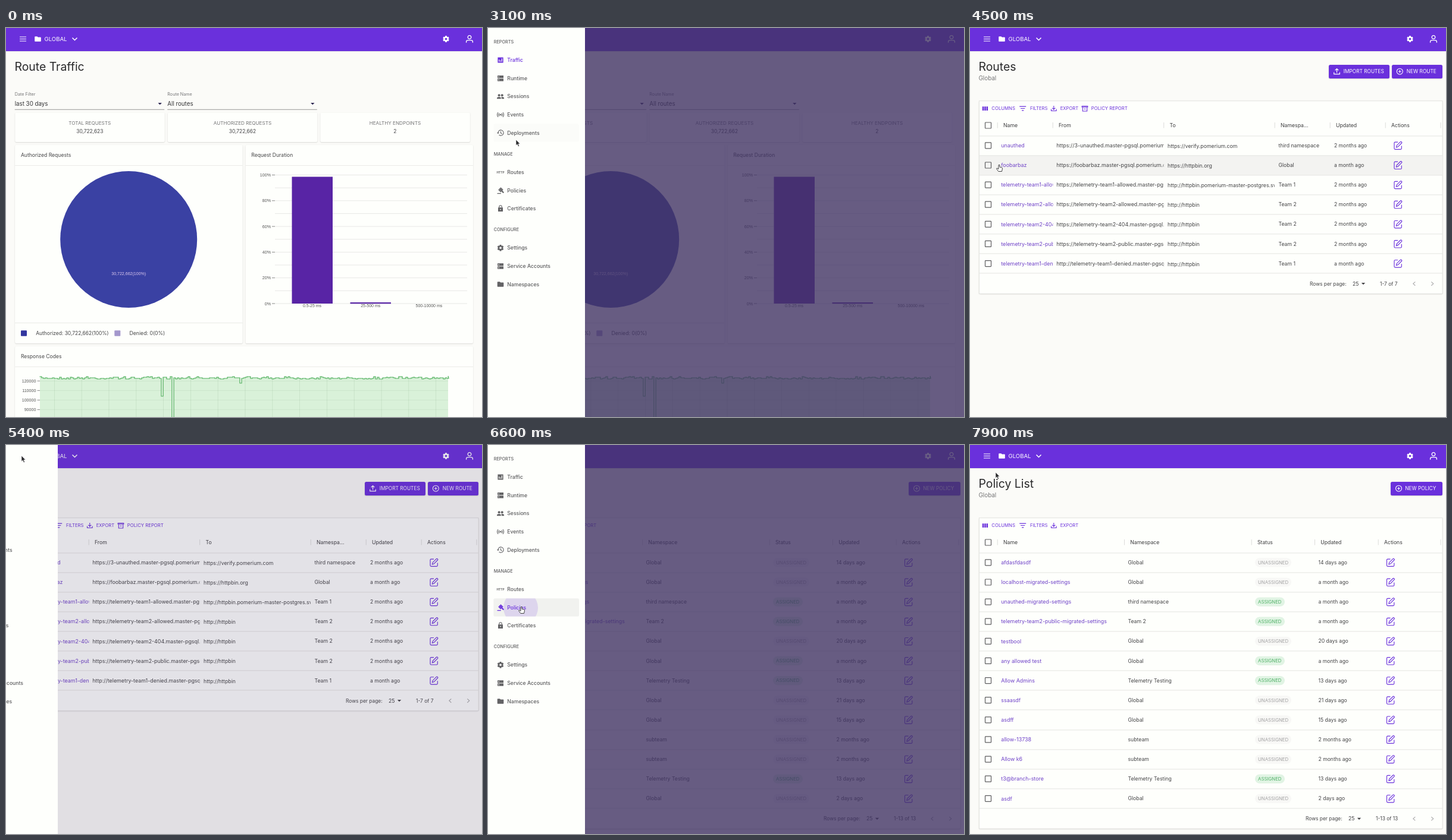
Animation of 800x655 px, one loop 8 s. Source, as an HTML page with a canvas:

```html
<!DOCTYPE html>
<html lang="en">
<head>
<meta charset="utf-8">
<title>Console tour</title>
<style>
html, body { margin: 0; width: 100%; height: 100%; overflow: hidden; background: #fbfbf8; }
canvas { display: block; width: 800px; height: 655px; }
</style>
</head>
<body>
<canvas id="stage" width="800" height="655"></canvas>
<script>
const ctx = document.getElementById('stage').getContext('2d');
const LOOP = 8000, STEP = 100, DRAWER = 163, TAU = Math.PI * 2;
const PURPLE = '#6a30dc', LINK = '#6f42c8', INK = '#444446', MUTED = '#757577';
const INTER = 'Inter, sans-serif', ARIAL = '"Liberation Sans", Arial, sans-serif';

// ---- drawing helpers ----
function text(s, x, y, size, color = INK, o = {}) {
  ctx.font = `${o.weight || 400} ${size}px ${o.family || INTER}`;
  ctx.textAlign = o.align || 'left';
  ctx.fillStyle = color;
  ctx.fillText(s, x, y + size * 0.36);
}
function clipped(s, x, y, right, size, color) {
  ctx.save();
  ctx.beginPath();
  ctx.rect(x, y - 10, right - x, 20);
  ctx.clip();
  text(s, x, y, size, color);
  ctx.restore();
}
function rect(x, y, w, h, color) {
  ctx.fillStyle = color;
  ctx.fillRect(x, y, w, h);
}
function round(x, y, w, h, r, color) {
  ctx.fillStyle = color;
  ctx.beginPath();
  ctx.roundRect(x, y, w, h, r);
  ctx.fill();
}
function path(d, x, y, color, width = 1.2) {
  ctx.save();
  ctx.translate(x, y);
  const p = new Path2D(d);
  if (width) {
    ctx.strokeStyle = color;
    ctx.lineWidth = width;
    ctx.stroke(p);
  } else {
    ctx.fillStyle = color;
    ctx.fill(p, 'evenodd');
  }
  ctx.restore();
}
function circle(x, y, r, color) {
  ctx.fillStyle = color;
  ctx.beginPath();
  ctx.arc(x, y, r, 0, TAU);
  ctx.fill();
}
function card(x, y, w, h) {
  ctx.save();
  ctx.shadowColor = 'rgba(0,0,0,.16)';
  ctx.shadowBlur = 2;
  ctx.shadowOffsetY = 0.7;
  round(x, y, w, h, 2, '#fefffc');
  ctx.restore();
}
const caret = (x, y, color = INK) => path('M-3.2-1.5H3.2L0 1.8Z', x, y, color, 0);

// ---- icons, centred on x, y ----
function gear(x, y, color, hole) {
  ctx.fillStyle = color;
  for (let i = 0; i < 6; i++) {
    ctx.save();
    ctx.translate(x, y);
    ctx.rotate(i * TAU / 6);
    ctx.fillRect(-1.5, -5.3, 3, 3);
    ctx.restore();
  }
  circle(x, y, 4.1, color);
  circle(x, y, 1.8, hole);
}
const folder = (x, y, c) => path('M-5.3-3.5Q-5.3-4.3-4.5-4.3H-1L0.2-3H4.5Q5.3-3 5.3-2.2V3.4Q5.3 4.2 4.5 4.2H-4.5Q-5.3 4.2-5.3 3.4Z', x, y, c, 0);
const server = (x, y, c) => path('M-5-4.7H5V-.5H-5ZM-5 .6H5V4.8H-5ZM-3.6-3.3V-1.9H-2.2V-3.3ZM-3.6 2V3.4H-2.2V2Z', x, y, c, 0);
const pencil = (x, y) => path('M0-5.8H-4.5Q-6-5.8-6-4.3V5Q-6 6.5-4.5 6.5H4.8Q6.3 6.5 6.3 5V.6M-2.6 3.1L-1.9 .1L4.4-6.2Q5.3-7 6.3-6Q7.3-5 6.4-4.1L.2 2.2Z', x, y, PURPLE, 1.15);
const exportIcon = (x, y) => path('M0-4.5V1.6M-2.5-.8L0 1.7L2.5-.8M-4.3 1V4H4.3V1', x, y, PURPLE, 1.1);
const icons = {
  chart(x, y, c) {
    path('M-4.6-4.6H4.6V4.6H-4.6ZM-2.9-.8V2.8H-1.7V-.8ZM-.6 .6V2.8H.6V.6ZM1.7-2.8V2.8H2.9V-2.8Z', x, y, c, 0);
  },
  server,
  people(x, y, c) {
    circle(x - 2.4, y - 2, 2, c);
    circle(x + 2.7, y - 2, 2, c);
    path('M-6 4V2.5Q-5.5 .6-2.5 .6Q.5 .6 .8 2.5V4ZM1.8 4V2.5Q1.8 1.3 1.1 .7Q5.7 .2 6 2.5V4Z', x, y, c, 0);
  },
  signal(x, y, c) {
    circle(x, y, 1.3, c);
    path('M-2-2.4Q-4 0-2 2.4M2-2.4Q4 0 2 2.4M-4-4Q-7 0-4 4M4-4Q7 0 4 4', x, y, c, 1.1);
  },
  history(x, y, c) {
    path('M-4.1 0A4.6 4.6 0 1 1-2.6 3.4M.5-2.4V.4L2.6 1.7', x, y, c, 1.1);
    path('M-6-.4H-2.2L-4.1 1.8Z', x, y, c, 0);
  },
  http(x, y, c) { text('HTTP', x, y, 4.8, c, { weight: 700, align: 'center' }); },
  gavel(x, y, c) {
    path('M-5.5 5.1H.8', x, y, c, 1.3);
    path('M-3.2-1.7L1 2.5M-.2-4.7L4 -.5', x, y, c, 1.8);
    path('M-1.7-3.2L2.5 1M.6-1L5.2 4', x, y, c, 2.2);
  },
  lock(x, y, c) {
    path('M-4-1.7H4V5H-4ZM-.9 1.6A.9.9 0 1 0 .9 1.6A.9.9 0 1 0-.9 1.6Z', x, y, c, 0);
    path('M-2.2-1.6V-3A2.2 2.2 0 0 1 2.2-3V-1.6', x, y, c, 1.1);
  },
  gear: (x, y, c) => gear(x, y, c, '#fff'),
  folder
};

// ---- shared page parts ----
function topBar() {
  ctx.save();
  ctx.shadowColor = 'rgba(0,0,0,.2)';
  ctx.shadowBlur = 2;
  rect(0, 0, 800, 39, PURPLE);
  ctx.restore();
  path('M-5.5-3.5H5.5M-5.5 0H5.5M-5.5 3.5H5.5', 28.5, 18.5, '#fff', 1.1);
  folder(53.5, 18.5, '#fff');
  text('GLOBAL', 64.5, 19, 9.6, '#fff');
  path('M-4-2.1L0 2L4-2.1', 115.5, 18.5, '#fff', 1.5);
  gear(739.5, 18.5, '#fff', PURPLE);
  path('M-2.9-3A2.9 2.9 0 1 1 2.9-3A2.9 2.9 0 1 1-2.9-3ZM-5.4 6.3V4.6Q-5.4 2.2-2.8 2.2H2.8Q5.4 2.2 5.4 4.6V6.3', 779, 18.5, '#fff', 1.3);
}
function button(x, w, label, textX) {
  ctx.save();
  ctx.shadowColor = 'rgba(0,0,0,.18)';
  ctx.shadowBlur = 2;
  ctx.shadowOffsetY = 0.7;
  round(x, 62, w, 23, 2.5, PURPLE);
  ctx.restore();
  text(label, textX, 73.5, 8.3, '#fff');
}
function plus(x) {
  path('M-5 0A5 5 0 1 1 5 0A5 5 0 1 1-5 0M-2.4 0H2.4M0-2.4V2.4', x, 73.2, '#fff', 1.1);
}
const pageTitle = s => text(s, 14.5, 65.5, 19.4, '#29292b');
const checkbox = y => path('M-4.2-5H4.2Q5-5 5-4.2V4.2Q5 5 4.2 5H-4.2Q-5 5-5 4.2V-4.2Q-5-5-4.2-5Z', 30.5, y, '#5d5d5f', 1.2);

const ROW = 33.12, TOP = 181.5;
const rowY = i => TOP + ROW * (i + 0.5) - 0.2;

function tablePage(page, hover) {
  const { title, cols, rows, editX, shift } = page;
  const bottom = TOP + rows.length * ROW;
  pageTitle(title);
  text('Global', 14.5, 84.3, 9.9, MUTED);
  card(15.3, 122.8, 778.8, bottom + 34.3 - 122.8);
  ctx.strokeStyle = '#dededb';
  ctx.lineWidth = 0.8;
  ctx.strokeRect(15.3, 122.8, 778.8, bottom + 34 - 122.8);

  for (let i = 0; i < 3; i++) rect(20.8 + i * 3.4, 132.2, 2.5, 6.8, PURPLE);
  text('COLUMNS', 36.3, 135.5, 7.75, PURPLE);
  path('M-5.5-3.3H5.5M-3.6 0H3.6M-1.6 3.3H1.6', 88.7, 135.5, PURPLE, 1.2);
  text('FILTERS', 101, 135.5, 7.6, PURPLE);
  exportIcon(140.8, 135.5);
  text('EXPORT', 151.7, 135.5, 7.7, PURPLE);

  checkbox(164);
  cols.forEach(([label, x]) => {
    rect(x - 10.3, 159, 1, 9.5, '#dcdcda');
    text(label, x, 164, 8.7, '#3c3c3e');
  });
  rect(790.5, 159, 1, 9.5, '#dcdcda');
  if (hover >= 0 && hover < rows.length) rect(16, TOP + hover * ROW, 777.5, ROW, '#f3f3f1');
  for (let i = 0; i <= rows.length; i++) rect(16, Math.round(TOP + i * ROW) - 0.6, 778, 1, '#e4e4e1');
  rows.forEach((row, i) => {
    checkbox(rowY(i));
    page.row(row, rowY(i));
    pencil(editX, rowY(i));
  });

  const y = bottom + 17.2;
  text('Rows per page:', 571 - shift, y, 8.4);
  text('25', 643 - shift, y, 8.7);
  caret(661 - shift, y);
  text(`1-${rows.length} of ${rows.length}`, 689 - shift, y, 8.4);
  path('M2-3.2L-1.5 0L2 3.2', 746.3, y, '#aaa', 1.1);
  path('M-2-3.2L1.5 0L-2 3.2', 777.3, y, '#aaa', 1.1);
}

// ---- routes ----
const M = '2 months ago', A = 'a month ago', HB = 'http://httpbin';
const from = (name, scheme = 'https') => `${scheme}://${name}.master-pgsql.pomerium.com`;
const routes = {
  title: 'Routes', editX: 719, shift: 0,
  cols: [['Name', 56], ['From', 149], ['To', 335.5], ['Namespa...', 522], ['Updated', 615], ['Actions', 708]],
  rows: [
    ['unauthed', from('3-unauthed'), 'https://verify.pomerium.com', 'third namespace', M],
    ['foobarbaz', from('foobarbaz'), 'https://httpbin.org', 'Global', A],
    ['telemetry-team1-allowed', from('telemetry-team1-allowed'), 'http://httpbin.pomerium-master-postgres.svc', 'Team 1', M],
    ['telemetry-team2-allowed', from('telemetry-team2-allowed'), HB, 'Team 2', M],
    ['telemetry-team2-404', from('telemetry-team2-404'), HB, 'Team 2', M],
    ['telemetry-team2-public', from('telemetry-team2-public'), HB, 'Team 2', M],
    ['telemetry-team1-denied', from('telemetry-team1-denied', 'http'), HB, 'Team 1', A]
  ],
  row([name, src, dst, space, updated], y) {
    clipped(name, 52.3, y, 139.5, 8.9, LINK);
    clipped(src, 145.3, y, 325.5, 8.9, INK);
    clipped(dst, 332, y + 0.8, 512, 8.75, INK);
    text(space, 518.5, y, 8.7);
    text(updated, 612, y, 8.55);
  }
};
function routesPage(hover) {
  tablePage(routes, hover);
  path('M-4.8-2.8H4.8V-4.4H-4.8ZM-3.7-2V4H3.7V-2M-1.5 .2H1.5', 193, 136, PURPLE, 1.1);
  text('POLICY REPORT', 203.8, 135.5, 7.75, PURPLE);
  button(603, 102, 'IMPORT ROUTES', 627.8);
  path('M0 2.2V-4.3M-2.8-1.8L0-4.5L2.8-1.8M-4.8 1.6V4.6H4.8V1.6', 616.5, 73, '#fff', 1.2);
  button(709, 85, 'NEW ROUTE', 733.8);
  plus(722.3);
}

// ---- policies ----
const G = 'Global', TT = 'Telemetry Testing';
const policies = {
  title: 'Policy List', editX: 706.5, shift: 7,
  cols: [['Name', 56], ['Namespace', 269.3], ['Status', 483], ['Updated', 589.3], ['Actions', 696]],
  rows: [
    ['afdasfdasdf', G, 0, '14 days ago'],
    ['localhost-migrated-settings', G, 0, A],
    ['unauthed-migrated-settings', 'third namespace', 1, A],
    ['telemetry-team2-public-migrated-settings', 'Team 2', 1, A],
    ['testbool', G, 0, '20 days ago'],
    ['any allowed test', G, 1, A],
    ['Allow Admins', TT, 1, '13 days ago'],
    ['ssaasdf', G, 0, '21 days ago'],
    ['asdff', G, 0, '15 days ago'],
    ['allow-13738', 'subteam', 0, M],
    ['Allow k6', 'subteam', 0, M],
    ['t3@branch-store', TT, 1, '13 days ago'],
    ['asdf', G, 0, '2 days ago']
  ],
  row([name, space, assigned, updated], y) {
    text(name, 52.3, y, 8.9, LINK);
    text(space, 265.5, y, 8.7);
    round(479, y - 7.6, assigned ? 50 : 61, 15.2, 7.6, assigned ? '#e1f4e4' : '#f8f8f6');
    text(assigned ? 'ASSIGNED' : 'UNASSIGNED', 484, y, 7.8, assigned ? '#4fb066' : '#a3a3a3');
    text(updated, 585.5, y, 8.6);
  }
};
function policiesPage(hover) {
  tablePage(policies, hover);
  button(707, 87, 'NEW POLICY', 731.3);
  plus(720.5);
}

// ---- dashboard ----
function trafficPage() {
  pageTitle('Route Traffic');
  [['Date Filter', 'last 30 days', 14.7], ['Route Name', 'All routes', 271.3]].forEach(([label, value, x]) => {
    text(label, x, 111.8, 7.2, MUTED);
    text(value, x, 127.5, 9.75, '#333335');
    rect(x, 136.8, 251.5, 0.9, '#8c8c8c');
    caret(x + 244, 127.5, '#2b2550');
  });
  [['TOTAL REQUESTS', '30,722,623', 15.2], ['AUTHORIZED REQUESTS', '30,722,662', 271.8], ['HEALTHY ENDPOINTS', '2', 528.3]].forEach(([label, value, x]) => {
    card(x, 142.5, 251.6, 49.5);
    text(label, x + 125.6, 159.7, 8.15, MUTED, { align: 'center' });
    text(value, x + 125.6, 174.2, 8.4, INK, { align: 'center' });
  });
  pieCard();
  barCard();
  lineCard();
}
function panel(title, x, y, w, h) {
  card(x, y, w, h);
  text(title, x + 9.8, y + 17, 8.6);
  rect(x, y + 34, w, 0.8, '#e7e7e4');
}
function pieCard() {
  panel('Authorized Requests', 15.1, 197, 382.6, 334);
  circle(206.2, 356, 115, '#3a41a3');
  text('30,722,662(100%)', 206.2, 413, 7.05, '#dcc8ee', { family: ARIAL, align: 'center' });
  rect(15, 496.3, 382.6, 0.8, '#e4e4e1');
  round(25, 509.2, 10, 9.6, 1, '#32369f');
  text('Authorized: 30,722,662(100%)', 50.3, 514, 8.45);
  round(182.3, 509.2, 10, 9.6, 1, '#a498cc');
  text('Denied: 0(0%)', 207.5, 514, 8.7);
}
function barCard() {
  panel('Request Duration', 402.5, 197, 382.5, 334);
  for (let i = 0; i <= 10; i++) {
    const y = 247.5 + i * 21.65;
    rect(452, y - 0.5, 323, 1, '#e8e8e6');
    if (i % 2) continue;
    rect(447, y - 0.5, 5, 1, '#8a8a8a');
    text(`${100 - i * 10}%`, 445, y, 7.1, '#555', { family: ARIAL, align: 'right' });
  }
  rect(480.5, 250.5, 68.5, 213.5, '#5824a5');
  rect(578.5, 462, 68.5, 2.2, '#5824a5');
  ['0.5-25 ms', '25-500 ms', '500-10000 ms'].forEach((s, i) => {
    text(s, 514.5 + i * 98.2, 467.8, 7, '#555', { family: ARIAL, align: 'center' });
  });
}
function lineCard() {
  panel('Response Codes', 15.1, 536, 769.9, 140);
  let seed = 7;
  const rand = () => (seed = (seed * 16807) % 2147483647) / 2147483647;
  const line = new Path2D();
  line.moveTo(57, 586.5);
  for (let x = 57; x < 742; x += 3) {
    let y = 588 + Math.round(rand() * 3);
    if (rand() > 0.92) y = 587;
    if (x === 261) y = 620;
    if (x === 279) y = 680;
    if (x === 393) y = 598;
    line.lineTo(x, y);
    line.lineTo(x + 3, y);
  }
  line.lineTo(743, 586);
  const area = new Path2D(line);
  area.lineTo(743, 690);
  area.lineTo(57, 690);
  ctx.fillStyle = '#d9f1d9';
  ctx.fill(area);
  ctx.save();
  ctx.clip(area);
  for (let x = 81; x < 743; x += 45.8) rect(x, 580, 0.8, 75, 'rgba(60,100,60,.12)');
  for (let y = 594; y < 655; y += 16.1) rect(57, y, 686, 0.8, 'rgba(60,100,60,.1)');
  ctx.restore();
  ctx.strokeStyle = '#4bad58';
  ctx.lineWidth = 1.2;
  ctx.stroke(line);
  for (let i = 0; i < 4; i++) {
    const y = 594.3 + i * 16.1;
    rect(52.5, y - 0.5, 4.5, 1, '#8a8a8a');
    text(String(120000 - i * 10000), 50.5, y, 7.15, '#555', { family: ARIAL, align: 'right' });
  }
}

// ---- side drawer ----
const headings = [['REPORTS', 23.5], ['MANAGE', 212], ['CONFIGURE', 339.5]];
const items = [
  ['Traffic', 'chart', 54], ['Runtime', 'server', 84.7], ['Sessions', 'people', 115.3],
  ['Events', 'signal', 146], ['Deployments', 'history', 176.5],
  ['Routes', 'http', 243], ['Policies', 'gavel', 273.5], ['Certificates', 'lock', 304],
  ['Settings', 'gear', 370.3], ['Service Accounts', 'server', 401], ['Namespaces', 'folder', 431.5]
];
function drawer(open, active, pointer, ripple, pressed) {
  ctx.save();
  ctx.translate(Math.round((open - 1) * DRAWER), 0);
  rect(0, 0, DRAWER, 655, '#fefffc');
  headings.forEach(([s, y]) => text(s, 9.7, y, 7.25, '#5e5e60', { weight: 500 }));
  items.forEach(([label, icon, y]) => {
    if (Math.abs(pointer.y - y) < 15.3) {
      ctx.save();
      ctx.beginPath();
      ctx.roundRect(9.3, y - 15.3, 143.7, 30.6, 2);
      ctx.clip();
      rect(9, y - 16, 145, 32, pressed ? 'rgba(0,0,0,.05)' : 'rgba(0,0,0,.013)');
      if (ripple > 0) circle(55, y + 0.5, ripple, 'rgba(106,48,220,.15)');
      ctx.restore();
    }
    const on = label === active;
    icons[icon](21, y, on ? PURPLE : '#636365');
    text(label, 32.3, y, 8.65, on ? PURPLE : '#5c5c5e', { weight: 500 });
  });
  ctx.restore();
}

// ---- pointer: time, x, y, shape from then on ----
const track = [
  [1300, 34, 13, 'arrow'], [1400, 31, 15, 'hand'], [1500, 29, 17, 'hand'],
  [1900, 29, 18, 'arrow'], [2300, 29, 18, 'arrow'], [3100, 47, 188, 'arrow'],
  [3300, 47, 188, 'arrow'], [3400, 50, 240, 'hand'], [3900, 50, 240, 'arrow'],
  [4400, 50, 240, 'arrow'], [4500, 49, 230, 'hand'], [4600, 47, 212, 'arrow'],
  [5200, 28, 20, 'hand'], [5300, 26, 18, 'hand'], [5400, 26, 18, 'arrow'],
  [5600, 26, 18, 'arrow'], [6200, 56, 272, 'hand'], [6800, 56, 272, 'arrow'],
  [7200, 56, 272, 'arrow'], [7900, 43, 46, 'arrow'], [8000, 43, 46, 'arrow']
];
function pointerAt(t) {
  const i = track.findIndex(k => k[0] > t) - 1;
  if (i < 0) return null;
  const [t0, x0, y0, shape] = track[i], [t1, x1, y1] = track[i + 1];
  const p = (t - t0) / (t1 - t0);
  return { x: x0 + (x1 - x0) * p, y: y0 + (y1 - y0) * p, shape };
}
function drawPointer({ x, y, shape }) {
  const hand = shape === 'hand';
  const d = hand
    ? 'M-1 .8Q0-.4 1 .8V4.2L4.5 5Q5.7 5.4 5.4 7L4.5 11.5H-1.2L-4.4 7.2Q-4.5 5.7-3 6.2L-1 7.6Z'
    : 'M0 0V9.7L2.2 7.7L3.8 11.4L5.5 10.7L3.9 7.1H6.8Z';
  path(d, x, y, hand ? '#fff' : '#2a2a2c', 0);
  path(d, x, y, hand ? '#444' : '#fff', hand ? 1 : 0.6);
}

// ---- timing ----
function bezier(x1, y1, x2, y2) {
  const at = (a, b, s) => 3 * a * s * (1 - s) ** 2 + 3 * b * s * s * (1 - s) + s ** 3;
  return x => {
    if (x <= 0 || x >= 1) return Math.max(0, Math.min(1, x));
    let lo = 0, hi = 1;
    for (let i = 0; i < 24; i++) {
      const mid = (lo + hi) / 2;
      if (at(x1, x2, mid) < x) lo = mid; else hi = mid;
    }
    return at(y1, y2, lo);
  };
}
const easeOut = bezier(0, 0, 0.2, 1), easeInOut = bezier(0.4, 0, 0.2, 1), sharp = bezier(0.4, 0, 0.6, 1);
const visits = [
  { show: 1900, start: 1766, press: 3400, close: 3700 },
  { show: 5400, start: 5350, press: 6300, close: 6600 }
];
function menuAt(t) {
  const v = visits.find(v => t >= v.show && t < v.close + 195);
  if (!v) return null;
  const p = (t - v.start) / 225, q = (t - v.close) / 195;
  const ripple = Math.max(0, t - v.press - 100) * 0.145;
  return t > v.close
    ? { open: 1 - sharp(q), fade: 1 - easeInOut(q), ripple, pressed: true }
    : { open: easeOut(p), fade: easeInOut(p), ripple, pressed: t >= v.press };
}

function draw(t) {
  const pointer = pointerAt(t), menu = menuAt(t);
  const hover = pointer && !menu ? Math.floor((pointer.y - TOP) / ROW) : -1;
  rect(0, 0, 800, 655, '#fbfbf8');
  let active = 'Traffic';
  if (t < 3600) trafficPage();
  else if (t < 6500) { active = 'Routes'; routesPage(hover); }
  else { active = 'Policies'; policiesPage(hover); }
  topBar();
  if (menu) {
    rect(0, 0, 800, 655, `rgba(66,52,100,${0.8 * menu.fade})`);
    drawer(menu.open, active, pointer, menu.ripple, menu.pressed);
  }
  if (pointer) drawPointer(pointer);
}

function tick() {
  draw(Math.floor((performance.now() % LOOP) / STEP) * STEP);
  requestAnimationFrame(tick);
}
tick();
</script>
</body>
</html>
```
